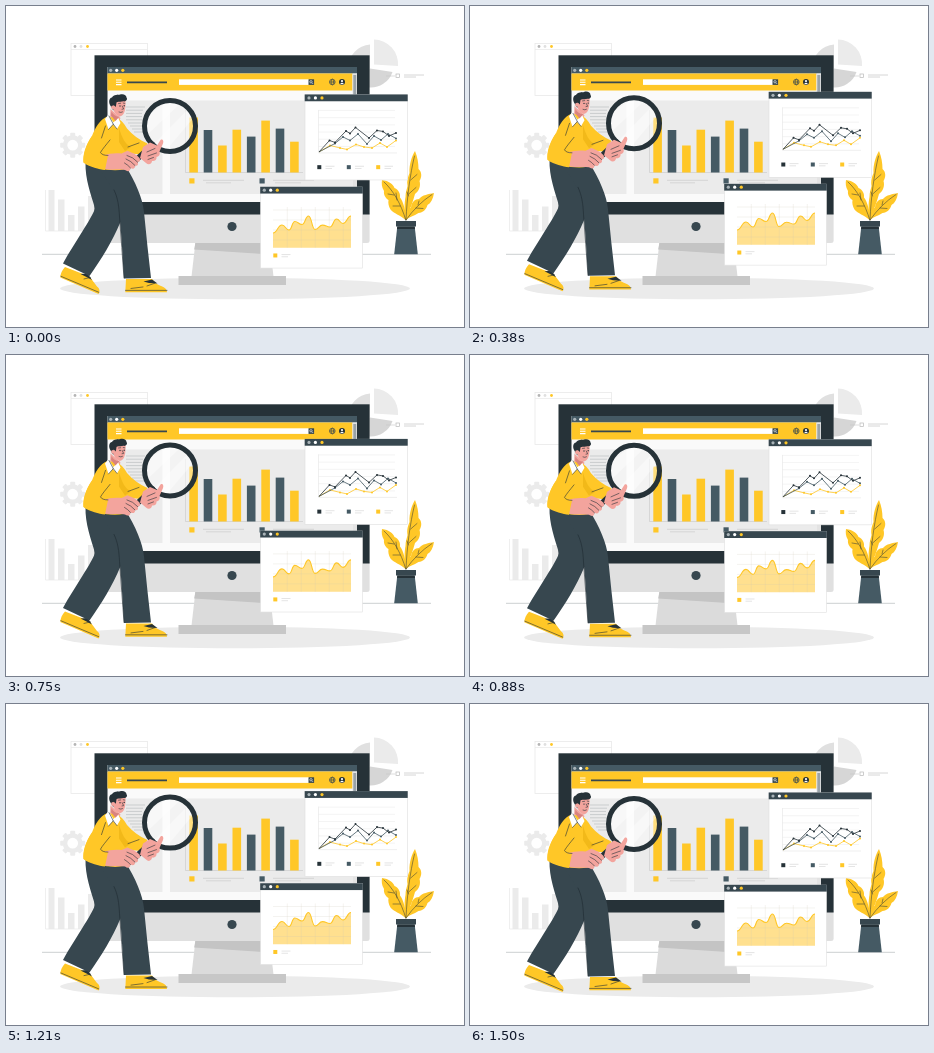
These frames come from a looping animation (458x321 px, 1.54 s). An HTML page:

```html
<!DOCTYPE html>
<html lang="en">
<head>
<meta charset="utf-8">
<title>Data analysis</title>
<style>
html, body { margin: 0; width: 100%; height: 100%; overflow: hidden; background: #fff; }
svg { display: block; width: 458px; height: 321px; }
.ink { fill: none; stroke: #263238; stroke-width: .6; stroke-linecap: round; stroke-linejoin: round; }
.y { fill: #ffc727; }
.d { fill: #455a64; }
.k { fill: #263238; }
.s { fill: #37474f; }
.g { fill: #ebebeb; }
.skin { fill: #f3a49d; }
.hair { fill: none; stroke: #c8c8c8; stroke-width: .6; }
</style>
</head>
<body>
<svg viewBox="0 0 458 321" xmlns="http://www.w3.org/2000/svg">
<defs>
  <clipPath id="lens"><circle cx="164" cy="120" r="24"/></clipPath>
</defs>

<!-- backdrop -->
<rect x="65" y="37.500" width="76.500" height="52" fill="#fff" stroke="#e9e9e9" stroke-width=".8"/>
<path d="M65 43.500H141.500" stroke="#e9e9e9" stroke-width=".7"/>
<circle cx="69" cy="40.500" r="1.400" fill="#b5b5b5"/>
<circle cx="75" cy="40.500" r="1.400" fill="#e0e0e0"/>
<circle cx="81.500" cy="40.500" r="1.400" class="y"/>
<g id="gear" transform="translate(66.700 139.200)"></g>
<path class="g" d="M42.500 184h6v41h-6zM52 193.500h6.500v31.500h-6.500zM62 209h6.500v16h-6.500zM72 200.500h6.500v24.500h-6.500zM82 190h6.500v35h-6.500z"/>
<path d="M39.500 184V225H92" fill="none" stroke="#e9e9e9" stroke-width=".7"/>
<path fill="#e0e0e0" d="M364 62.500V38.500A24 24 0 0 0 342 62Z"/>
<path fill="#d6d6d6" d="M364 62.500L386.500 66A23 23 0 0 1 342 62Z"/>
<path class="g" d="M368 58.500V33.500A24.500 24.500 0 0 1 392 60Z"/>
<path d="M380 70H389" class="hair"/>
<rect x="390" y="68" width="3.500" height="3.500" fill="#fff" stroke="#b8b8b8" stroke-width=".7"/>
<path d="M398 69H418M398 71H410" stroke="#d2d2d2" stroke-width=".9"/>
<path d="M36 248.300H425" stroke="#a9afb2" stroke-width=".6"/>
<ellipse cx="229" cy="282.500" rx="175" ry="10.800" class="g"/>

<!-- monitor -->
<path fill="#dbdbdb" d="M189.500 236H263.500L267.500 270.500H185.500Z"/>
<path fill="#c4c4c4" d="M189.500 236H263.500L265 248.500L188.200 243.500Z"/>
<rect x="172.500" y="270" width="107.500" height="9" fill="#c7c7c7"/>
<path fill="#e0e0e0" d="M88.500 207H363.600V234.500Q363.600 237 361 237H91Q88.500 237 88.500 234.500Z"/>
<rect x="88.500" y="49.300" width="275.100" height="159.200" class="k"/>
<circle cx="226" cy="220.500" r="4.600" class="s"/>
<rect x="101.500" y="61" width="249.500" height="135" fill="#fafafa"/>
<rect x="101.500" y="61" width="249.500" height="6.500" class="d"/>
<circle cx="104.700" cy="64.300" r="1.600" fill="#a9b3b8"/>
<circle cx="110.700" cy="64.300" r="1.600" fill="#fff"/>
<circle cx="116.800" cy="64.300" r="1.600" class="y"/>
<rect x="101.500" y="67.500" width="245" height="17" class="y"/>
<path d="M110 74H115.500M110 76.300H115.500M110 78.600H115.500" stroke="#fff" stroke-width="1.100"/>
<path d="M121 76.300H161" stroke="#37474f" stroke-width="1.800"/>
<rect x="173" y="73.300" width="130" height="5.600" fill="#fff"/>
<rect x="302.500" y="73.300" width="5.600" height="5.600" class="s"/>
<circle cx="305" cy="75.800" r="1.200" fill="none" stroke="#fff" stroke-width=".6"/>
<path d="M306 76.800L307.200 78" stroke="#fff" stroke-width=".6"/>
<g fill="none" stroke="#37474f" stroke-width=".7">
  <circle cx="326.300" cy="76" r="2.800"/>
  <ellipse cx="326.300" cy="76" rx="1.200" ry="2.800"/>
  <path d="M323.500 76H329.100"/>
</g>
<circle cx="336" cy="76" r="3" class="k"/>
<circle cx="336" cy="75.100" r="1.100" fill="#fff"/>
<path d="M334 78.200Q336 75.400 338 78.200Z" fill="#fff"/>
<rect x="346.500" y="67.500" width="4.500" height="128.500" fill="#e3e3e3"/>
<rect x="347.300" y="69" width="2.900" height="26" fill="#9aa3a8"/>
<rect x="104" y="94.500" width="52.500" height="93.500" class="g"/>
<rect x="164" y="94.500" width="183" height="93.500" class="g"/>
<path d="M120 101H139M120 104.200H137M120 107.400H136M120 110.600H136M120 113.800H136M122 117H136M124 120H137M126 123H137M128 126H138" stroke="#bcc0c2" stroke-width=".7"/>
<path d="M179.500 104V166.500H297" class="hair"/>
<g id="bars"></g>
<rect x="183.300" y="172.300" width="5.200" height="5.200" class="y"/>
<rect x="253.500" y="172.300" width="5.200" height="5.200" class="d"/>
<path d="M197 174.300H238M200 176.800H225M267 174.300H308M269 176.800H295" stroke="#d0d0d0" stroke-width=".8"/>

<!-- plant -->
<path class="y" d="M400 214C398 205 398.500 196 399.500 191C399.500 186 401 183 401.500 180C400.500 175 402 171 403.500 167C403 158 406 150 409 145C411.500 151 412.500 157 412.500 163C416 166 416 171 413.500 175C415 180 413 185 409 188C407 196 403 205 400 214Z"/>
<path class="y" d="M399.500 214C394 209 388 207.500 384.500 203.500C382.500 200 382 197 382.500 194C379 192 377.500 188 378 185C375.500 181 375.500 177 376 174C383 175 387 178 388.500 182C393 184 394.500 188 394 191.500C397.500 196 399.500 204 400.500 214Z"/>
<path class="y" d="M400 214.500C400 208 402.500 203.500 405 201.500C405.500 196 409 193 413 193C416 189 423 188 428 187C427 193 425 197 421.500 199C420 204 417 206.500 412.500 207C408 210 403 210.500 400 214.500Z"/>
<path class="ink" style="stroke-width:.5" d="M400 214C401 191 404 169 408.500 150M402.700 188L410 181.500M404.700 174L411 168.500M402.500 190L401 186M399.800 214C395 198 387 184 378 176M391 194L390 187M388 189L382 188M394 200L387 200M400 214C407 204 416 195 426 188.500M410 202L417 202.500M412 199L413 195"/>
<path class="s" d="M390 215H410V220.500H390Z"/>
<path class="d" d="M391.300 220.500H408.700L411.800 248.200H388.200Z"/>
<path class="k" d="M391.300 220.500H408.700L409 223H391Z"/>

<!-- line chart window -->
<g class="float">
  <rect x="299" y="88.800" width="102.500" height="85.200" fill="#fff" stroke="#dedede" stroke-width=".6"/>
  <rect x="298.700" y="88.500" width="103" height="6.800" class="s"/>
  <circle cx="303" cy="92" r="1.600" fill="#a9b3b8"/>
  <circle cx="309.400" cy="92" r="1.600" fill="#fff"/>
  <circle cx="316" cy="92" r="1.600" class="y"/>
  <g id="lines"></g>
  <rect x="311.300" y="159.200" width="4" height="4" class="k"/>
  <rect x="340.800" y="159.200" width="4" height="4" class="d"/>
  <rect x="370.200" y="159.200" width="4" height="4" class="y"/>
  <path d="M319.500 160.300H328.500M319.500 162.500H326M349 160.300H358M349 162.500H355.500M378.500 160.300H387M378.500 162.500H385" stroke="#d8d8d8" stroke-width=".7"/>
</g>

<!-- area chart window -->
<g class="float" data-swing="2.550">
  <rect x="254.500" y="181.100" width="102" height="81" fill="#fff" stroke="#e0e0e0" stroke-width=".6"/>
  <rect x="254.200" y="180.800" width="102.600" height="6.800" class="s"/>
  <circle cx="258.300" cy="184.200" r="1.600" fill="#a9b3b8"/>
  <circle cx="264.700" cy="184.200" r="1.600" fill="#fff"/>
  <circle cx="271.300" cy="184.200" r="1.600" class="y"/>
  <g id="area"></g>
  <rect x="267.300" y="247.500" width="4" height="4" class="y"/>
  <path d="M275.500 248.600H284.500M275.500 250.800H282" stroke="#d8d8d8" stroke-width=".7"/>
</g>

<!-- man -->
<g class="float">
  <path class="y" d="M59 261C56 264 54.500 268 54.300 271.500L92.500 288C94.500 285 93.500 282.500 91 280.500L83.500 270.500Z"/>
  <path class="ink" d="M54.800 270.300L92.800 286.300M78 273L84.500 271.500"/>
  <path class="k" d="M74.500 268L81.500 267.500L86 274L80.500 271Z"/>
  <path class="y" d="M120 273H146L150 277.500C155 280.500 161 281 161 286.300H119.300Z"/>
  <path class="ink" d="M119.500 284.400H161M141 280L149 277.200M125 282.500L137 281"/>
  <path class="k" d="M137.500 275.500L146 273.500L151.500 277.500L143 277Z"/>
  <path class="s" d="M79.500 156C79 174 85 188 89 202.500C86 212 69 236 57 257.500L83.500 270C95 254 107 234 114 217L118 160Z"/>
  <path class="s" d="M91 160C104 177 111.500 190 113 207C116 230 116.500 252 118 272.500L145 272C142.500 250 140 228 138 206C136.500 192 130 177 118.500 158Z"/>
  <path class="ink" style="stroke:#1f2b31" d="M108 184C112 192 113 201 113.500 211C115 231 116.500 252 118 272"/>

  <path class="skin" d="M104.500 103L104 116L110.500 121.500L114.500 112Z"/>
  <path class="y" d="M101.500 110.500C94 113 89 122 86 130C81 137 77 148 77.300 156.500C88 162 105 166 117.500 163.500L119 147L135.500 148.500L141.500 137.500C133 134 126.500 128.500 121 122.500C118 117 114.500 113.500 111 112Z"/>
  <path fill="#e6ac0b" opacity=".5" d="M113 122C116 132 119 138 125 141L119 145L113 136Z"/>
  <path fill="#fff" d="M102.500 108.500L107.500 116.500L112 111.500L114.500 117L111 123L107 118.500L102.500 123.500L99 113Z"/>
  <path class="ink" d="M103 110L107.300 118.200L102.500 123.500M107.300 118.200L111 123"/>

  <g transform="translate(.5 -.4)">
    <path class="skin" d="M106.500 95C105 103 108 109 113 111C118 110.500 119.500 104 119 93.500L111 92Z"/>
    <path fill="#d9837e" d="M105 106C107 110 110 111.500 113 111L109 115.500L104.500 110Z"/>
    <path class="k" d="M104.500 101C101.500 97 102.500 92.500 105.500 92C107 88.500 112 89.500 113.500 89C117 88 120 89.500 120 92C121.500 94 119.500 96.300 117 95.800C114 96.800 111.500 95.500 110 97L109.300 101.500L107 99.500L106.800 105Z"/>
    <circle class="skin" cx="106.500" cy="101.800" r="1.900"/>
    <path class="ink" d="M112 98L114.200 97.700M116.700 97.500L118.300 97.800M115.700 100.500L117.200 103.400L115.500 103.700M112.500 106.500Q114.500 107.500 116 106.400"/>
    <circle class="k" cx="113.500" cy="100.500" r=".7"/>
    <circle class="k" cx="117.700" cy="100.200" r=".7"/>
  </g>

  <circle cx="164" cy="120" r="24" fill="#fff" opacity=".4"/>
  <g clip-path="url(#lens)">
    <path fill="#fff" opacity=".35" d="M138 112L164 94H178L140 130ZM146 140L184 101L190 109L158 147Z"/>
  </g>
  <circle cx="164" cy="120" r="25.500" fill="none" stroke="#263238" stroke-width="5"/>
  <path d="M146.500 138.500L128 156" stroke="#263238" stroke-width="5.500" stroke-linecap="round"/>

  <path class="skin" d="M137 141L144 136.500L151 139.500L154.500 134C156.500 132.500 158 134.500 157 137.500L153.500 145.500C154.500 149 152.500 150.500 150.500 151C151 154 148.500 155.500 146 155C146 158 142.500 159.500 140 157L134 152Z"/>
  <path class="ink" d="M141 146L149 142.500M142 150L150.500 147M142 153.500L147.500 151.500"/>
  <path class="skin" d="M96 150C104 147 110 147 115.500 147.500L121.500 144.800C126 146.500 131 149 133.500 152C135 155 133 156.500 131.500 156C133 159 131 160.500 129 159.500C129.500 162.500 127 163.500 124.500 162C124.500 165.500 121.500 166 119 164C112 163 106 164.500 98 163Z"/>
  <path class="ink" d="M121 149.500Q127 151 131.500 156M120 153Q125 155 129 159.500M118.500 157Q122 159 124.500 162"/>
  <path class="y" d="M86 130C79.500 139 76 150 78 157C84 161 93 163.500 99 164L102 149.500C96 149.500 94 148.500 93.500 145L102 128Z"/>
  <path class="ink" d="M104 134C100 139 96.500 143 94.500 146.500Q96 149.500 102 149.500M99.500 120L95.500 132M122 141L133 137"/>
</g>
</svg>

<script>
const PERIOD = 1540, LEAD = 45, SWING = 2.3;
const get = id => document.getElementById(id);
const path = (d, attrs) => `<path d="${d}" ${attrs}/>`;
const repeat = (n, step, f) => Array.from({ length: n }, (_, i) => f(i * step)).join('');

// Gear: a ring with eight short teeth
get('gear').innerHTML =
  '<circle r="7.700" fill="none" stroke="#ebebeb" stroke-width="4.600"/>' +
  repeat(8, 45, a => `<rect x="-2.500" y="-12.500" width="5" height="4" rx="1" class="g" transform="rotate(${a})"/>`);

const tops = [111.5, 124, 139.5, 123.7, 130.6, 114.6, 122.6, 135.7];
get('bars').innerHTML = tops.map((y, i) =>
  `<rect x="${183.3 + i * 14.4}" y="${y}" width="8.600" height="${166.5 - y}" class="${[1, 4, 6].includes(i) ? 'd' : 'y'}"/>`
).join('');

function plot(color, pts) {
  const dots = pts.slice(1).map(([x, y]) => `<circle cx="${x}" cy="${y}" r="1" fill="${color}"/>`).join('');
  return path('M' + pts.join('L'), `fill="none" stroke="${color}" stroke-width=".8"`) + dots;
}
get('lines').innerHTML =
  path(repeat(6, 7.2, y => `M312.500 ${104.5 + y}H389`), 'stroke="#ededed" stroke-width=".6" fill="none"') +
  path('M312.500 104V147H391', 'stroke="#e4e4e4" stroke-width=".6" fill="none"') +
  plot('#ffc727', [[313, 146], [324, 139.5], [334, 142], [341, 143.5], [350, 138.5], [358, 141], [366, 142], [374, 137], [381, 141], [390, 134.5]]) +
  plot('#455a64', [[313, 146], [329, 137.5], [337, 131], [344, 134.5], [352, 128], [361, 138], [368, 130], [375, 134], [382, 128], [390, 132.5]]) +
  plot('#263238', [[313, 146], [323.5, 134.5], [329, 136.5], [340, 125], [344, 127.5], [349.5, 121.5], [363, 132], [371, 124.5], [377, 125.5], [383, 130], [390, 127]]);

// Smooth curve with level tangents at each point
const hills = [[267, 227], [276, 219], [283, 224], [288.8, 215.5], [296, 218.5], [302.5, 210], [309, 223.5], [316.5, 219.2], [324, 221], [330.5, 213], [337, 217.5], [345, 210]];
const curve = hills.map(([x, y], i) => {
  if (!i) return `M${x} ${y}`;
  const [px, py] = hills[i - 1], mid = (x + px) / 2;
  return `C${mid} ${py} ${mid} ${y} ${x} ${y}`;
}).join('');
get('area').innerHTML =
  path(curve + 'V241.800H267Z', 'fill="#ffe08f"') +
  path(repeat(5, 14, x => `M${281.3 + x} 201V241.800`) + repeat(4, 10, y => `M267 ${204 + y}H345`), 'stroke="#c9c2ad" stroke-opacity=".4" stroke-width=".5" fill="none"') +
  path(curve, 'fill="none" stroke="#ffc727" stroke-width="1.100"');

const floats = [...document.querySelectorAll('.float')];
function draw(now) {
  const lift = 1 - Math.cos(2 * Math.PI * (now % PERIOD + LEAD) / PERIOD);
  for (const el of floats) {
    const dy = -(el.dataset.swing || SWING) * lift;
    el.setAttribute('transform', `translate(0 ${dy.toFixed(3)})`);
  }
}
function tick() {
  draw(performance.now());
  requestAnimationFrame(tick);
}
tick();
</script>
</body>
</html>
```
